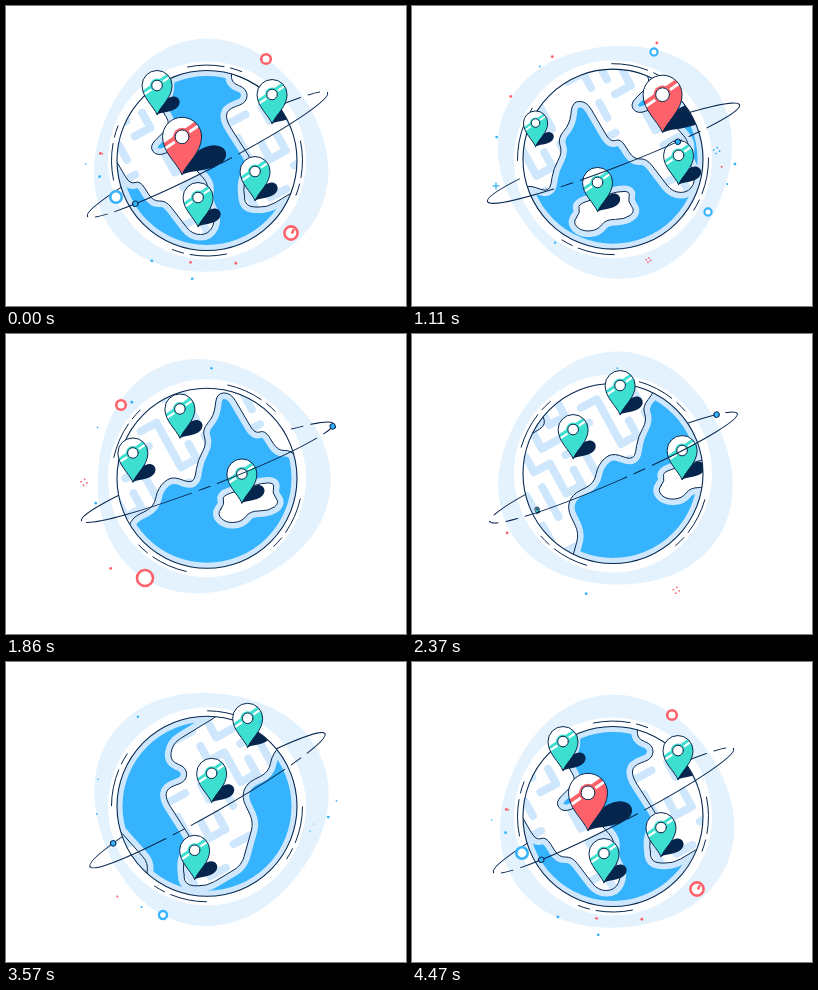
An HTML page with a canvas for the animation above (4.5 s loop, 400 px wide and 300 px high).

```html
<!DOCTYPE html>
<html>
<head>
<meta charset="utf-8">
<style>
html, body { margin: 0; width: 100%; height: 100%; overflow: hidden; background: #fff; }
canvas { display: block; width: 400px; height: 300px; }
</style>
</head>
<body>
<canvas id="stage"></canvas>
<script>
const LOOP = 4500, LAST = 4470, R = 90, TAU = Math.PI * 2, DEG = TAU / 360;
const NAVY = '#08284f', SEA = '#35b3fc', BAND = '#cfe7fc', PALE = '#e4f2fe', TEAL = '#3de0d0', RED = '#fd626b';
const SHIFT = [300, -164]; // how far the map travels in one loop
const SPAN = Math.hypot(...SHIFT), [UX, UY] = SHIFT.map(v => v / SPAN);
const canvas = document.getElementById('stage'), g = canvas.getContext('2d');
const dpr = window.devicePixelRatio || 1;
canvas.width = 400 * dpr;
canvas.height = 300 * dpr;

const clamp = v => Math.max(0, Math.min(1, v));
const wave = (p, peak) => Math.cos(TAU * (p - peak));
const pairs = text => text.trim().split(/\s+/).map(p => p.split(',').map(Number));

function seeded(seed) {
  return () => (seed = seed * 16807 % 2147483647) / 2147483647;
}

// Closed polygon with rounded corners
function coast(text, round = 9) {
  const pts = pairs(text), n = pts.length, path = new Path2D();
  const toward = ([ax, ay], [bx, by]) => {
    const f = Math.min(0.5, round / Math.hypot(bx - ax, by - ay));
    return [ax + (bx - ax) * f, ay + (by - ay) * f];
  };
  pts.forEach((p, i) => {
    path.lineTo(...toward(p, pts[(i + n - 1) % n]));
    path.quadraticCurveTo(...p, ...toward(p, pts[(i + 1) % n]));
  });
  path.closePath();
  return path;
}

const continent = coast(`-262,210 -240,211 -205,190 -193,147 -205,122 -200,108 -178,97 -174,78
  -161,66 -138,74 -134,50 -125,34 -130,20 -118,6 -115,-17 -101,-17 -77,24 -67,20 -54,41 -41,40
  -15,74 2,74 9,58 -1,40 2,24 -30,-12 -50,-4 -58,-14 -36,-36 -47,-53 -38,-70 -42,-110 -140,-75
  -245,0 -225,38 -274,68 -277,86 -260,92 -260,106 -280,113 -281,124 -254,166 -264,185`);
const island = coast(`-115,104 -106,113 -90,112 -82,101 -63,101 -52,93 -60,83 -57,73 -70,73 -110,86 -107,94`);
const lands = [continent, island];

// Streets: a random maze along the two axes of the map
const streets = new Path2D();
const streetDice = seeded(77);
for (let u = -340; u < 40; u += 18) for (let v = -90; v < 90; v += 17) {
  if (streetDice() > 0.62) continue;
  const x = u * UX - v * UY, y = u * UY + v * UX;
  streets.moveTo(x, y);
  if (streetDice() < 0.5) streets.lineTo(x + 18 * UX, y + 18 * UY);
  else streets.lineTo(x - 17 * UY, y + 17 * UX);
}

const pins = pairs('-199,72 -152,28 -50,-46 -235,127 -25,14 -252,204 -9,66 -90,93');
const RED_PIN = 4;
const pinShape = new Path2D('M0 0C-4-9-15-17-15-29A15 15 0 0 1 15-29C15-17 4-9 0 0Z');
const shadowShape = new Path2D('M0 0C3-10 8-17 16-18C25-18 25-7 15-4C9-2 4-2 0 0Z');

// Key rings: x, y, radius, share of the loop; small sparks are strewn around the globe
const sparks = [
  [260, 53, 4.8, 0], [285, 227, 6.6, 0], [110, 191, 6, 0.05], [242, 46, 3.6, 0.25],
  [296, 206, 3.6, 0.25], [115, 71, 4.8, 0.42], [139, 244, 8, 0.42], [157, 253, 4, 0.8]
].map(([x, y, r, peak]) => ({ x, y, r, peak, kind: 'ring', color: r > 4.5 && r !== 6 ? RED : SEA }));
const dice = seeded(2024);
for (let i = 0; i < 52; i++) {
  const angle = dice() * TAU, far = 103 + 27 * dice(), pick = dice();
  const kind = pick < 0.06 ? 'plus' : pick < 0.12 ? 'cluster' : 'dot';
  sparks.push({
    x: 201 + far * Math.cos(angle), y: 150 + far * Math.sin(angle), r: kind === 'dot' ? 1.4 : 3,
    peak: dice(), kind, color: dice() < 0.4 ? RED : SEA
  });
}

function scoped(draw) { g.save(); draw(); g.restore(); }
function fill(color, path) { g.fillStyle = color; path ? g.fill(path) : g.fill(); }
function stroke(color, width, path) {
  g.strokeStyle = color;
  g.lineWidth = width;
  path ? g.stroke(path) : g.stroke();
}
function circle(x, y, r) { g.beginPath(); g.arc(x, y, r, 0, TAU); }

// Soft three-cornered backdrop that turns behind the globe
function drawBlob(p) {
  const turn = (-95 + 240 * p) * DEG;
  g.beginPath();
  for (let a = 0; a < TAU; a += 0.05) {
    const r = 116.5 + 4.5 * Math.cos(3 * (a - turn));
    g.lineTo(3 + r * Math.cos(a), r * Math.sin(a) - 1);
  }
  fill(PALE);
}

function drawSpark({ x, y, r, peak, kind, color }, p) {
  const gap = Math.abs(p - peak), away = Math.min(gap, 1 - gap);
  const size = r * clamp(2 - away * 21);
  if (!size) return;
  if (kind === 'dot') {
    circle(x, y, size);
    fill(color);
  } else if (kind === 'ring') {
    circle(x, y, size);
    fill('#fff');
    stroke(color, Math.min(2.6, size * 0.6));
  } else if (kind === 'cluster') {
    for (let a = 0.2; a < TAU; a += TAU / 4) {
      circle(x + size * Math.cos(a), y + size * Math.sin(a), 0.9);
      fill(color);
    }
  } else {
    g.beginPath();
    g.moveTo(x - size, y); g.lineTo(x + size, y);
    g.moveTo(x, y - size); g.lineTo(x, y + size);
    stroke(color, 1.3);
  }
}

function drawOrbit(p, front) {
  const angle = (50 + 360 * p - 30 * Math.sin(Math.PI * p)) % 360 * DEG;
  scoped(() => {
    g.translate(0.5, -6);
    g.rotate((-25 + 4.6 * wave(p, 0.33)) * DEG);
    g.beginPath();
    g.ellipse(0, 0, 135, 14, 0, front ? 0 : Math.PI, front ? Math.PI : TAU);
    g.setLineDash([109, 8, 12, 8]);
    g.lineDashOffset = (front ? 1 : -1) * 274 * p;
    stroke(NAVY, 1);
    g.setLineDash([]);
    if (angle < Math.PI === front) {
      circle(-135 * Math.cos(angle), 14 * Math.sin(angle), 2.7);
      fill(SEA);
      stroke(NAVY, 1);
    }
  });
}

function drawMap(p) {
  circle(0, 0, R);
  g.clip();
  fill(SEA);
  stroke(BAND, 11);
  for (const k of [-1, 0, 1]) scoped(() => {
    g.translate(SHIFT[0] * (p + k), SHIFT[1] * (p + k));
    for (const land of lands) stroke(BAND, 12, land);
    for (const land of lands) fill('#fff', land);
    scoped(() => {
      g.clip(continent);
      stroke(BAND, 8, streets);
    });
    for (const land of lands) stroke(NAVY, 1, land);
  });
}

// Pins grow at the rim where they enter and shrink where they leave
function visiblePins(p) {
  const list = [];
  pins.forEach(([px, py], i) => {
    const red = i === RED_PIN;
    for (const k of [-1, 0, 1]) {
      const x = px + SHIFT[0] * (p + k), y = py + SHIFT[1] * (p + k);
      const along = x * UX + y * UY, across = y * UX - x * UY;
      const room = Math.sqrt(Math.max(0, R * R - across * across)) - Math.abs(along);
      const scale = clamp((room - 2) / (along > 0 ? 12 : 15));
      if (scale) list.push({ x, y, red, scale: scale * (red ? 1.3 : 1) });
    }
  });
  return list.sort((a, b) => a.y - b.y);
}

function place({ x, y, scale }, draw) {
  scoped(() => {
    g.translate(x, y);
    g.scale(scale, scale);
    draw();
  });
}

function drawShadow(pin) {
  place(pin, () => {
    if (pin.red) g.scale(1.5, 1.25);
    fill('#06254d', shadowShape);
  });
}

function drawPin(pin) {
  const color = pin.red ? RED : TEAL;
  place(pin, () => {
    scoped(() => {
      g.clip(pinShape);
      fill(color, pinShape);
      g.translate(0, -29);
      g.rotate(-0.6);
      g.fillStyle = '#fff';
      g.fillRect(-30, -30, 60, 26);
      g.fillRect(-30, -1, 60, 2.2);
    });
    stroke(NAVY, 1 / pin.scale, pinShape);
    circle(0, -29, 7);
    fill(color);
    circle(0, -29, 5.3);
    fill('#fff');
    stroke(NAVY, 1 / pin.scale);
  });
}

// A long and a short dash on each side of the globe
function drawRimArcs(p) {
  const swing = 14 - 14 * wave(p, 0.03);
  for (let side = 0; side < 360; side += 90) for (const [from, to] of [[-12, 10], [14, 21]]) {
    g.beginPath();
    g.arc(0, 0, 95.5, (side + from + swing) * DEG, (side + to + swing) * DEG);
    stroke(NAVY, 1);
  }
}

function frame() {
  const p = Math.min(1, performance.now() % LOOP / LAST);
  g.setTransform(dpr, 0, 0, dpr, 0, 0);
  g.lineCap = g.lineJoin = 'round';
  g.fillStyle = '#fff';
  g.fillRect(0, 0, 400, 300);
  scoped(() => {
    g.translate(201, 147.5 + 9 * wave(p, 0.107));
    drawBlob(p);
    circle(0, 0, 99);
    fill('#fff');
    drawRimArcs(p);
    drawOrbit(p, false);
    const shown = visiblePins(p);
    scoped(() => {
      drawMap(p);
      shown.forEach(drawShadow);
    });
    circle(0, 0, R);
    stroke(NAVY, 1.1);
    shown.forEach(drawPin);
    drawOrbit(p, true);
  });
  for (const spark of sparks) drawSpark(spark, p);
  requestAnimationFrame(frame);
}
frame();
</script>
</body>
</html>
```
